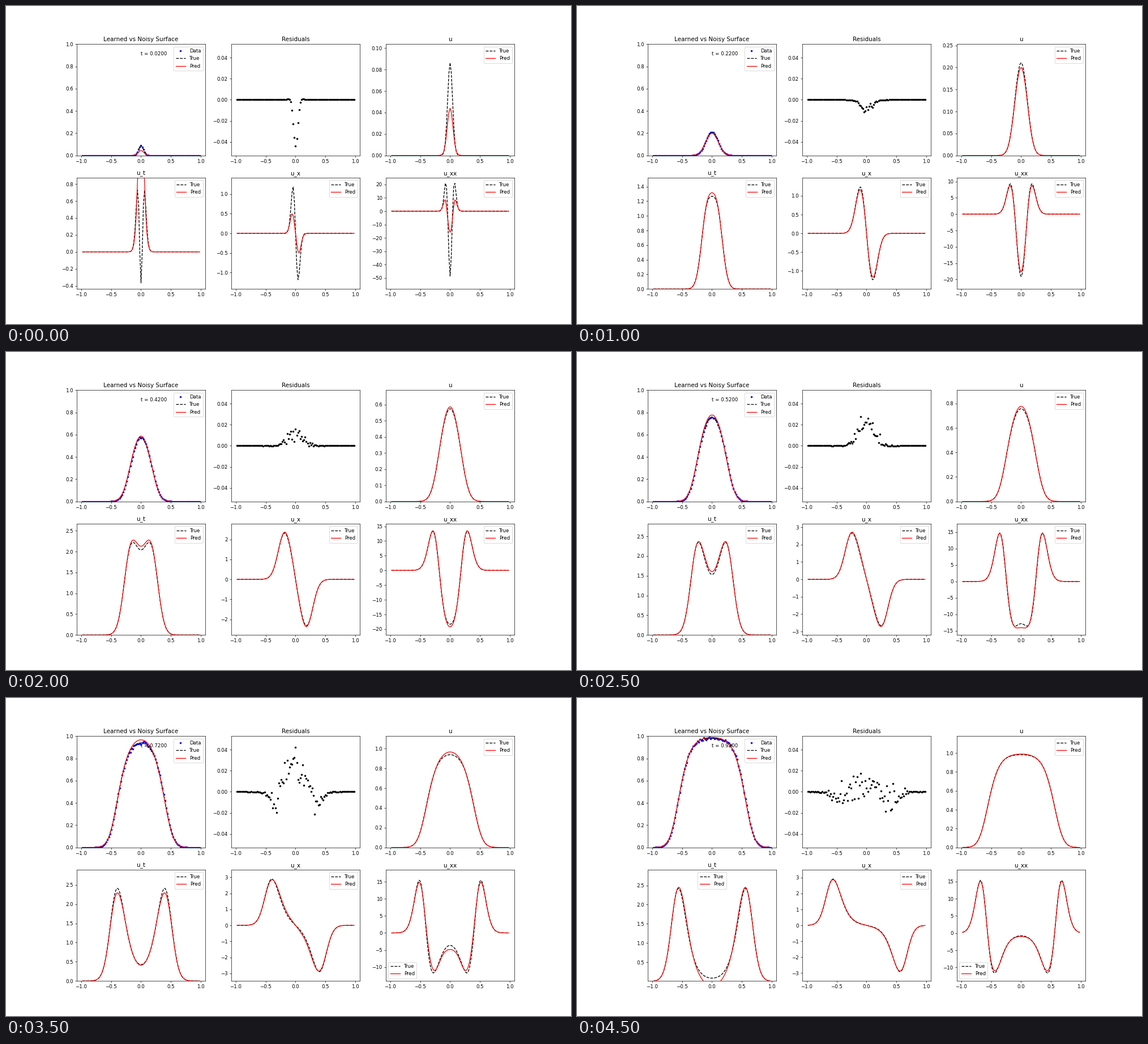
Write a matplotlib script that moves like this. It is 998 px wide and 561 px high and loops after 5000 ms.

```python
import numpy as np
import matplotlib.pyplot as plt
from matplotlib.animation import FuncAnimation

STEPS = 10
DIFF, RATE, CAP = 0.02, 10.05, 0.992
FINE, COARSE = 0.005, 0.02      # solver and sample spacing in x
TICK, SUBSTEPS = 0.02, 50       # sample spacing in t
TIMES = 0.02 + 0.1 * np.arange(STEPS)

grid = np.arange(-280, 281) * FINE
INNER = slice(21, 120)
x = grid[::4][INNER]


def solve():
    """Logistic growth with diffusion, sampled with finite differences."""
    u, dt = 0.1 * np.exp(-grid**2 / 0.00172), TICK / SUBSTEPS
    rows = []
    for _ in range(48):
        rows.append(u[::4])
        for _ in range(SUBSTEPS):
            bend = (np.roll(u, 1) - 2 * u + np.roll(u, -1)) / FINE**2
            u = u + dt * (DIFF * bend + RATE * u * (CAP - u))
    u = np.array(rows)
    u_t = np.gradient(u, TICK, axis=0)
    u_x = np.gradient(u, COARSE, axis=1)
    u_xx = (np.roll(u, 1, 1) - 2 * u + np.roll(u, -1, 1)) / COARSE**2
    fields = np.stack([u, u_t, u_x, u_xx], axis=1)
    return fields[1::5, :, INNER]


def bell(d, s):
    return np.exp(-d**2 / (2 * s * s))


def error(x, t):
    """Gap between prediction and truth: late start, overshoot, front lag."""
    start = -0.097 * np.exp(-t / 0.03) * bell(x, np.sqrt(0.00084 + 0.03 * t))
    swing = 0.4 * t * (t - 0.3) * (0.95 - t)
    swing -= 0.01 * np.sin(5 * np.pi * (t - 0.14)) * np.exp(-(t / 0.3)**2)
    lag = -0.016 * np.exp(-((t - 0.79) / 0.13)**2)
    front = 0.6 * t - 0.08
    return (start + swing * bell(x, 0.06 + 0.13 * t)
            + lag * (bell(x - front, 0.09) + bell(x + front, 0.09)))


def error_fields(t, h=1e-3):
    mid, left, right = error(x, t), error(x - h, t), error(x + h, t)
    return [mid,
            (error(x, t + h) - error(x, t - h)) / (2 * h),
            (right - left) / (2 * h),
            (right - 2 * mid + left) / h**2]


TRUE = solve()
PRED = TRUE + np.array([error_fields(t) for t in TIMES])
NOISE = np.random.default_rng(7).normal(0, 0.009, (STEPS, x.size))
DATA = TRUE[:, 0] * (1 + NOISE)

fig, axes = plt.subplots(2, 3, figsize=(16, 8.994), dpi=62.375)
surface, resid, *panels = axes.ravel()
titles = ["Learned vs Noisy Surface", "Residuals", "u", "u_t", "u_x", "u_xx"]
for ax, title in zip(axes.flat, titles):
    ax.set_title(title)
    ax.set_xlim(-1.078, 1.078)


def pair(ax):
    return (ax.plot(x, x, "k--", label="True")[0],
            ax.plot(x, x, "r-", label="Pred")[0])


def show(lines, true, pred):
    lines[0].set_ydata(true)
    lines[1].set_ydata(pred)


dots, = surface.plot(x, x, "b.", label="Data")
surface_pair = pair(surface)
surface.set_ylim(0, 1)
surface.legend(loc="upper right")
clock = surface.text(0, 0.9, "")

errors, = resid.plot(x, x, "k.")
resid.set_ylim(-0.0528, 0.0528)

pairs = [pair(ax) for ax in panels]
for ax in panels:
    ax.legend(loc="best")


def draw(k):
    dots.set_ydata(DATA[k])
    show(surface_pair, TRUE[k, 0], PRED[k, 0])
    clock.set_text(f"t = {TIMES[k]:.4f}")
    errors.set_ydata(PRED[k, 0] - DATA[k])
    for ax, lines, true, pred in zip(panels, pairs, TRUE[k], PRED[k]):
        show(lines, true, pred)
        low, high = 1.2 * true.min(), 1.2 * true.max()
        # Snap to zero so that its tick label stays
        ax.set_ylim(0 if abs(low) < high / 390 else low, high)
    return []


anim = FuncAnimation(fig, draw, frames=STEPS, interval=500, repeat=True,
                     repeat_delay=0, init_func=lambda: draw(0))
plt.show()
```
